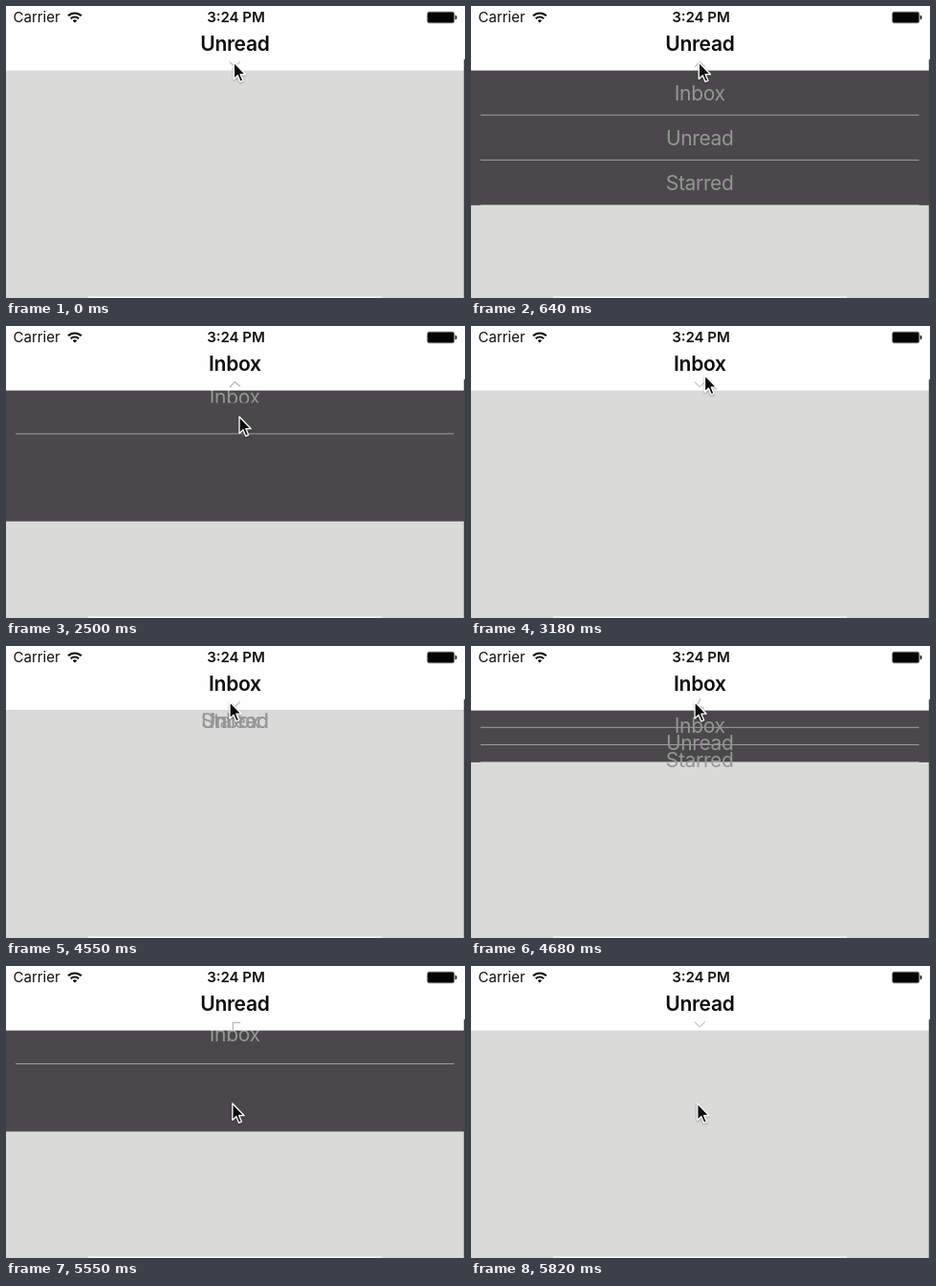
An HTML page that plays this animation: 480x306 px, repeating every 5.9 s.

```html
<!DOCTYPE html>
<html lang="en">
<head>
<meta charset="utf-8">
<title>Dropdown menu</title>
<style>
  html, body { margin: 0; width: 100%; height: 100%; overflow: hidden; background: #dadad9; }
  svg { display: block; width: 100%; height: 100%; }
  text { font-family: Inter, Roboto, sans-serif; }
  .status { font-size: 15px; fill: #111; }
  .title { font-size: 21px; font-weight: 600; letter-spacing: -.3px; fill: #0b0b0b; }
  .row { font-size: 21px; letter-spacing: -.35px; fill: #979697; }
  .middle { text-anchor: middle; }
  .line { stroke: #a09fa0; }
</style>
</head>
<body>
<svg viewBox="0 0 480 306">
  <defs>
    <clipPath id="shortRow"><rect y="60" width="480" height="20.5"/></clipPath>
    <filter id="shadow" x="-50%" y="-50%" width="200%" height="200%">
      <feDropShadow dx="0" dy="1" stdDeviation="1" flood-opacity=".35"/>
    </filter>
  </defs>

  <rect width="480" height="306" fill="#dadad9"/>
  <rect x="86" y="304.5" width="307" height="2" fill="#f7f7f7"/>
  <rect id="panel" y="67" width="479" fill="#4a484a"/>
  <g id="rows"></g>

  <rect width="480" height="67.6" fill="#fefefe"/>
  <path d="M479.4 56V306" stroke="#454545" stroke-width="1.2"/>
  <text class="status" x="7.5" y="17.3">Carrier</text>
  <g fill="none" stroke="#111" stroke-width="2">
    <path d="M65 10.3a9.7 9.7 0 0 1 13.8 0M67.7 13.2a5.9 5.9 0 0 1 8.4 0"/>
    <path d="M71.9 17.6L69.8 15.4a3 3 0 0 1 4.2 0z" fill="#111" stroke="none"/>
  </g>
  <text class="status middle" x="240.5" y="17.3" font-weight="600">3:24 PM</text>
  <rect x="440.7" y="6.2" width="28" height="11.6" rx="1.8" fill="#050505" stroke="#777" stroke-width=".8"/>
  <path d="M469.6 9.6q2 .3 2 2.4t-2 2.4z" fill="#222"/>
  <text id="title" class="title middle" x="239.4" y="47.4"></text>
  <path id="chevron" d="M-5.5 -2.7L0 2.7L5.5 -2.7" fill="none" stroke="#a5a5a5"/>

  <g id="cursor" filter="url(#shadow)">
    <path d="M0 0V17.4L4 13.7L6.8 20.4L9.6 19.2L6.8 12.7H12.2z"
          fill="#080808" stroke="#fff" stroke-width="1.3" stroke-linejoin="round"/>
  </g>
</svg>
<script>
const LOOP = 5900, TOP = 67.5, ROW = 47.1;
const byId = id => document.getElementById(id);
const [panel, rowGroup, title, chevron, cursor] =
  ["panel", "rows", "title", "chevron", "cursor"].map(byId);

const rows = ["Inbox", "Unread", "Starred"].map(name => {
  const add = (tag, attributes) => {
    const element = document.createElementNS("http://www.w3.org/2000/svg", tag);
    for (const key in attributes) element.setAttribute(key, attributes[key]);
    return rowGroup.appendChild(element);
  };
  const line = add("path", { class: "line", d: "M10 0H468.5" });
  const holder = add("g", {});
  const label = add("text", { class: "row middle", x: 239.2 });
  label.textContent = name;
  holder.append(label);
  return { line, holder, label };
});

const menuMoves = [
  { start: 320, duration: 310, opens: true },
  { start: 2475, duration: 255, opens: false },
  { start: 4550, duration: 310, opens: true },
  { start: 5440, duration: 340, opens: false },
];
// start, end, x, y of the pointer tip on arrival
const pointerMoves = [
  [780, 1050, 240, 105],
  [1600, 1770, 244, 95],
  [2960, 3180, 244.5, 51.5],
  [4050, 4180, 234, 58.5],
  [4850, 5140, 236.3, 143],
  [5190, 5230, 236.8, 144],
];

const progress = (t, start, end) => Math.min(1, Math.max(0, (t - start) / (end - start)));
const easeInOut = u => u * u * (3 - 2 * u);
const easeOut = u => 1 - (1 - u) ** 2;
const mix = (a, b, u) => a + (b - a) * u;
const place = (element, x, y, extra = "") =>
  element.setAttribute("transform", `translate(${x} ${y}) ${extra}`);
const show = (element, visible) =>
  element.setAttribute("visibility", visible ? "visible" : "hidden");

function drawMenu(t) {
  const move = menuMoves.findLast(m => t >= m.start);
  const u = move ? progress(t, move.start, move.start + move.duration) : 1;
  const p = easeInOut(u);
  const opening = Boolean(move?.opens);
  const open = opening ? p : 1 - p;
  const visible = opening || u < 1;

  panel.setAttribute("height", 0.5 + 3 * ROW * open);
  show(panel, visible && open > 0);
  rows.forEach(({ line, holder, label }, i) => {
    // Only the first row survives while the panel closes, cut short.
    const rowVisible = visible && (opening || i === 0);
    show(line, rowVisible);
    show(label, rowVisible);
    place(line, 0, TOP + ROW * (i + 1) * open - 0.3);
    const middle = opening ? mix(78.5, 91.3 + ROW * i, p) : 74.5 - 14 * p;
    label.setAttribute("y", middle + 7.6);
    if (opening) holder.removeAttribute("clip-path");
    else holder.setAttribute("clip-path", "url(#shortRow)");
  });
  place(chevron, 239.3, 61.2, `rotate(${180 * open})`);
}

function drawPointer(t) {
  let x = 238.3, y = 59;
  for (const [start, end, toX, toY] of pointerMoves) {
    const u = easeOut(progress(t, start, end));
    x = mix(x, toX, u);
    y = mix(y, toY, u);
  }
  place(cursor, x, y);
}

function draw(now) {
  const t = now % LOOP;
  title.textContent = t >= 2500 && t < 5450 ? "Inbox" : "Unread";
  drawMenu(t);
  drawPointer(t);
}

const begin = performance.now();
function tick() {
  draw(performance.now() - begin);
  requestAnimationFrame(tick);
}
tick();
</script>
</body>
</html>
```
